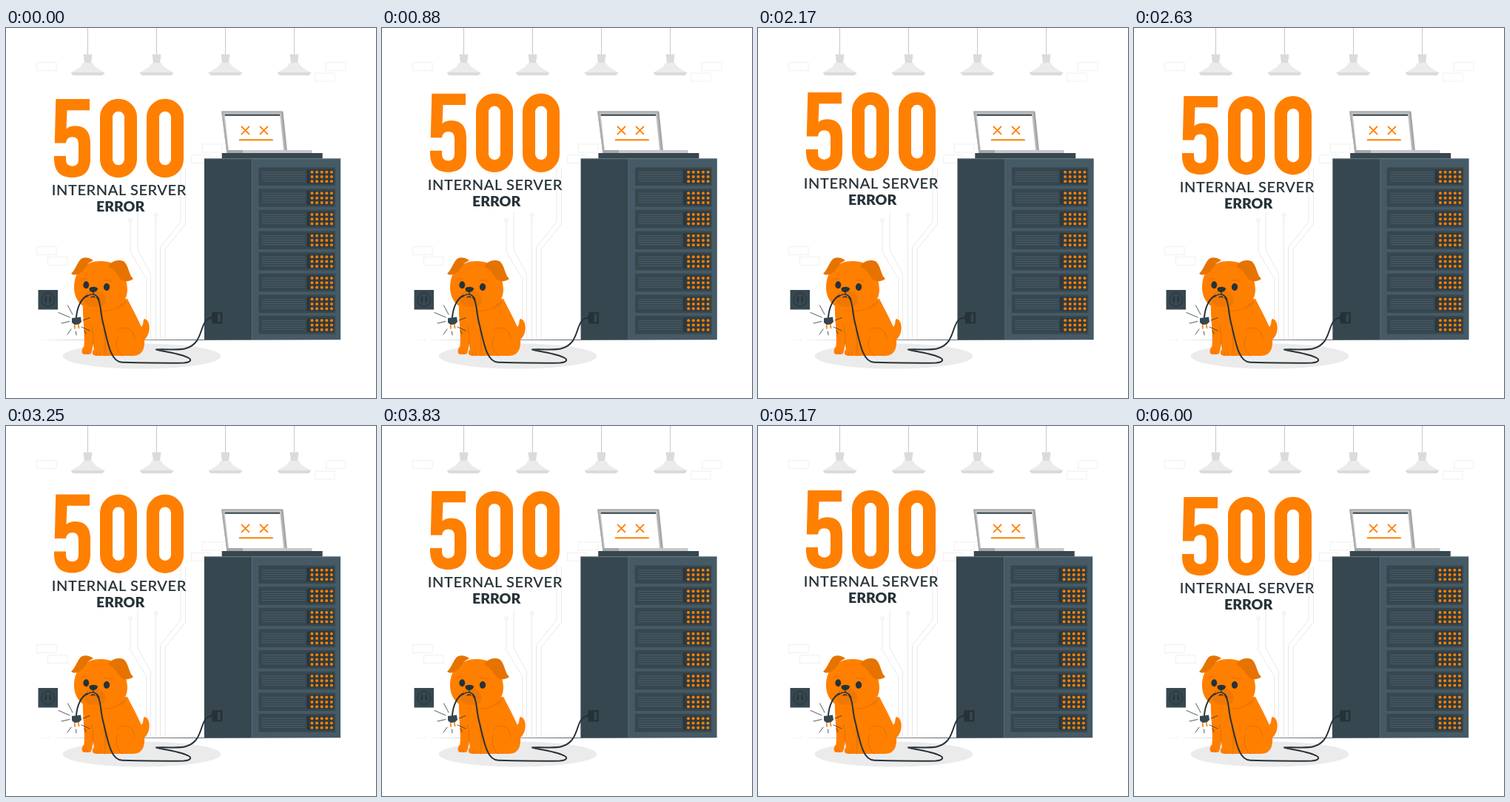
Write an HTML page that moves like this. It is 500x500 px and loops after 6.04 s.

```html
<!DOCTYPE html>
<html lang="en">
<head>
<meta charset="utf-8">
<title>500 Internal Server Error</title>
<style>
  html, body { margin: 0; width: 100%; height: 100%; overflow: hidden; background: #fff; }
  svg { display: block; width: 100%; height: 100%; }
  text { font-family: Lato, "Open Sans", sans-serif; font-size: 20px; text-anchor: middle; fill: #263238; }
  .line { fill: none; stroke-linecap: round; stroke-linejoin: round; }
  .ink { stroke: #263238; }
  .orange { stroke: #ff7f00; }
  .shade { stroke: #d96c00; }
</style>
</head>
<body>
<svg viewBox="0 0 500 500">
  <g id="lamps"></g>
  <g id="bricks" fill="none" stroke="#f0f0f0"></g>

  <g class="line" stroke="#e9e9e9">
    <path d="M168 262V303L189.500 338V421M178 249V300L195.500 332V421M202.500 255V421"/>
    <path d="M236 188V262L208.500 296V421M242.500 190V265L215 299V421"/>
    <circle cx="168" cy="260" r="2.200"/>
    <circle cx="202.500" cy="252.500" r="2.200"/>
  </g>

  <path d="M41 421.300Q250 420.500 460 421.300Q250 422.100 41 421.300Z" fill="#263238"/>
  <ellipse cx="183.500" cy="443.500" rx="107" ry="17" fill="#ebebeb"/>

  <g id="server">
    <path d="M291.800 169H427.800V176.500H291.800Z" fill="#37474f"/>
    <path d="M268 176.500H333V421.300H268Z" fill="#37474f"/>
    <path d="M332.300 176.500H452.200V421.300H332.300Z" fill="#455a64"/>
    <path d="M268 176.800H452.200M332.500 176.500V421" fill="none" stroke="#607580" stroke-width=".7"/>
    <g id="units"></g>
  </g>

  <g id="laptop">
    <path d="M291 112.500H374.500L380 166H298Z" fill="#a6a6a6"/>
    <path d="M291 112.500H371.500L377 166H298Z" fill="#c4c4c4"/>
    <path d="M292.500 113.500H373L378.500 166H299Z" fill="none" stroke="#a6a6a6" stroke-width="1.500"/>
    <path d="M295.500 116.500H370L375 165H301Z" fill="#fff"/>
    <path d="M295.500 116.500H370L370.200 118.700H295.800Z" fill="#37474f"/>
    <path d="M298 165H413.500V169H298Z" fill="#c7c7c7"/>
    <path d="M298 165H320V169H298Z" fill="#a6a6a6"/>
    <path class="line orange" stroke-width="1.900" d="M318.500 133.300L328.500 143.300M328.500 133.300L318.500 143.300M343.500 133.300L353.500 143.300M353.500 133.300L343.500 143.300M315.700 151.200H360"/>
  </g>

  <g id="title">
    <g role="img" aria-label="500">
      <path fill="#ff7f00" d="M67.300 96.500H113V111.700H82.500L81.500 137Q86 132.800 94 132.800C107 132.800 114 141 114 156V177C114 193.500 106 202.500 89.500 202.500C73 202.500 65 193.500 65 177V173.500H81V178Q81 187.200 89.500 187.200Q98 187.200 98 178V157Q98 147.800 89.500 147.800Q82 147.800 81 156H65.800Z"/>
      <g class="line orange" stroke-width="17">
        <rect x="135.500" y="104.800" width="33" height="89.500" rx="16.500"/>
        <rect x="198.500" y="104.800" width="33" height="89.500" rx="16.500"/>
      </g>
    </g>
    <text x="152.900" y="226.600" font-weight="500" letter-spacing=".6" stroke="#263238" stroke-width=".15">INTERNAL SERVER</text>
    <text x="154.700" y="248.700" font-weight="900" style="font-size: 19.500px">ERROR</text>
  </g>

  <g id="outlet">
    <path d="M43.500 354H70V380.500H43.500Z" fill="#37474f"/>
    <circle cx="56.800" cy="367.200" r="9" fill="#37474f" stroke="#263238"/>
    <path class="line ink" stroke-width="2" d="M53.800 364V370M59.800 364V370"/>
  </g>

  <g id="dog" fill="#ff7f00">
    <path d="M182 404C187 402 184 396 187 393C193 394 195 403 193 411C191 419 185 424 179 426Z"/>
    <path d="M104 368C103 390 107 413 105.500 430C101 435 102 441 106 441H113C117 440 116 431 118 426L119 434C115 439 117 443 122 443H172C183 443 188 434 187 422C186 405 175 388 164 366Z"/>
    <path d="M106 372C118 384 146 384 162 368L162 372C148 386 119 386 106 376Z" fill="#ee7700"/>
    <path class="line shade" stroke-width=".8" d="M118 430C119 421 117 413 116 404M134 443C134 427 134 416 132 407M150 411C157 400 173 405 174 420M151 417C147 428 150 438 158 443M106 437V440M110 437V440M122 439V442M127 439V442"/>
    <path d="M92 350C92 328 107 315 128 315C150 315 163 331 164 353C164 371 150 382 128 382C106 382 92 371 92 350Z"/>
    <path d="M111 318C105 329 96 337 88 332C94 327 97 314 103 311C108 309 114 311 118 314Z" fill="#e67300"/>
    <path d="M138 322C143 314 154 312 160 316C166 322 166 334 172 339C167 343 160 343 155 340C151 334 146 326 138 322Z" fill="#e67300"/>
    <path d="M107 361C109 352 128 352 132 361C138 370 133 378 119 377C108 377 103 370 107 361Z" fill="#f17800"/>
    <path class="line shade" stroke-width=".9" d="M101 341Q105 337 109 339M133 341Q139 339 143 343"/>
    <g fill="#263238">
      <ellipse cx="108.300" cy="347.200" rx="3.900" ry="5"/>
      <ellipse cx="136" cy="350" rx="4.100" ry="5"/>
      <path d="M112.500 352C114 349 122 349 124 352C124 355 120 357 118 357C115 357 112 355 112.500 352Z"/>
    </g>
    <path class="line ink" stroke-width="1.300" d="M118 356V360M109 363Q114 359 118 360Q123 361 126 367M115 364Q118 362 120 364"/>
  </g>

  <g id="cable">
    <path class="line ink" stroke-width="2" d="M123 364C129 370 127 386 132 402C138 428 142 451.500 157 451.800C190 452.500 218 453 240 452.500C248 452 252 449 247 446C238 440 216 438 203 434.500C218 433.500 233 436 243 433C266 427 262 400 272 394C275 391.500 278 391.500 284 391.500"/>
    <path class="line ink" stroke-width="2" d="M110 361.500C101 366 96 378 95 391"/>
    <path d="M89 392L101 390.500L102 397L98.500 400.500L92.500 401L89 398Z" fill="#37474f"/>
    <path class="line orange" stroke-width="1.700" d="M92.800 402L93 406M98 401.500L98.500 405.500"/>
    <path class="line ink" stroke-width=".8" d="M71 384.500L86 391M83.500 375L90 387M75 399L86 396.500M83 414L88 407M94.500 410L95 415M102 404L113 409M104 395L113 391.500M106 409L108 413"/>
  </g>

  <g id="socket">
    <path d="M278.500 384H292.500V399.500H278.500Z" fill="#263238"/>
    <path d="M286 386.500H290V397H286Z" fill="#37474f"/>
    <path d="M277.500 388.500H286V394.500H277.500Z" fill="#263238"/>
  </g>
</svg>

<script>
const byId = id => document.getElementById(id);
const range = n => [...Array(n).keys()];
const fill = (id, items, draw) => { byId(id).innerHTML = items.map(draw).join(""); };

fill("lamps", range(4), i => `
  <g transform="translate(${110.5 + 93 * i})">
    <path d="M0 0V36" stroke="#c7c7c7"/>
    <path d="M-6 35.500H6L4.500 47.500H-4.500Z" fill="#dbdbdb"/>
    <path d="M-6.500 47H6.500C8 53 16 56 23 60.500H-23C-16 56 -8 53 -6.500 47Z" fill="#ebebeb"/>
    <path d="M-23 60H23L20 64H-20Z" fill="#dbdbdb"/>
  </g>`);

const bricks = [[41, 46], [432, 46], [417, 60.5], [265, 156.5], [250, 171], [41, 295], [56, 309]];
fill("bricks", bricks, ([x, y]) => `<rect x="${x + .5}" y="${y + .5}" width="26.500" height="11"/>`);

const dots = range(15).map(i =>
  `<circle cx="${413.6 + i % 5 * 6.6}" cy="${6.2 + Math.floor(i / 5) * 6.3}" r="2"/>`).join("");
const vents = range(5).map(i => `M346 ${6.3 + i * 3}H404.500`).join("");
fill("units", range(8), i => `
  <g transform="translate(0 ${188.5 + 28.65 * i})">
    <path d="M341.500 0H445V24.500H341.500Z" fill="#37474f"/>
    <path d="${vents}" stroke="#50636c" stroke-width=".9"/>
    <path d="M407 3H409V21.500H407Z" fill="#263238"/>
    <path d="M409 2.500H443V22H409Z" fill="#2d3b42"/>
    <g fill="#ff7f00">${dots}</g>
  </g>`);

const LOOP = 6040, LEAD = 40, FLOAT = 1500, SHAKE = 6000;
const shakeStops = [0, -1, 2, -4, 4, -4, 4, -4, 2, -1, 0];

// Steady rise of 10px and fall back.
const floatY = t => -10 * (1 - Math.abs(2 * (t % FLOAT) / FLOAT - 1));

// Straight moves between evenly spaced stops.
function shakeX(t) {
  const pos = (t % SHAKE) / SHAKE * 10;
  const i = Math.floor(pos);
  return shakeStops[i] + (shakeStops[i + 1] - shakeStops[i]) * (pos - i);
}

function render(time) {
  const t = time % LOOP + LEAD;
  const sway = `translate(${shakeX(t)} 0)`;
  byId("title").setAttribute("transform", `translate(0 ${floatY(t)})`);
  byId("server").setAttribute("transform", sway);
  byId("socket").setAttribute("transform", sway);
}

const start = performance.now();
function tick() {
  render(performance.now() - start);
  requestAnimationFrame(tick);
}
tick();
</script>
</body>
</html>
```
